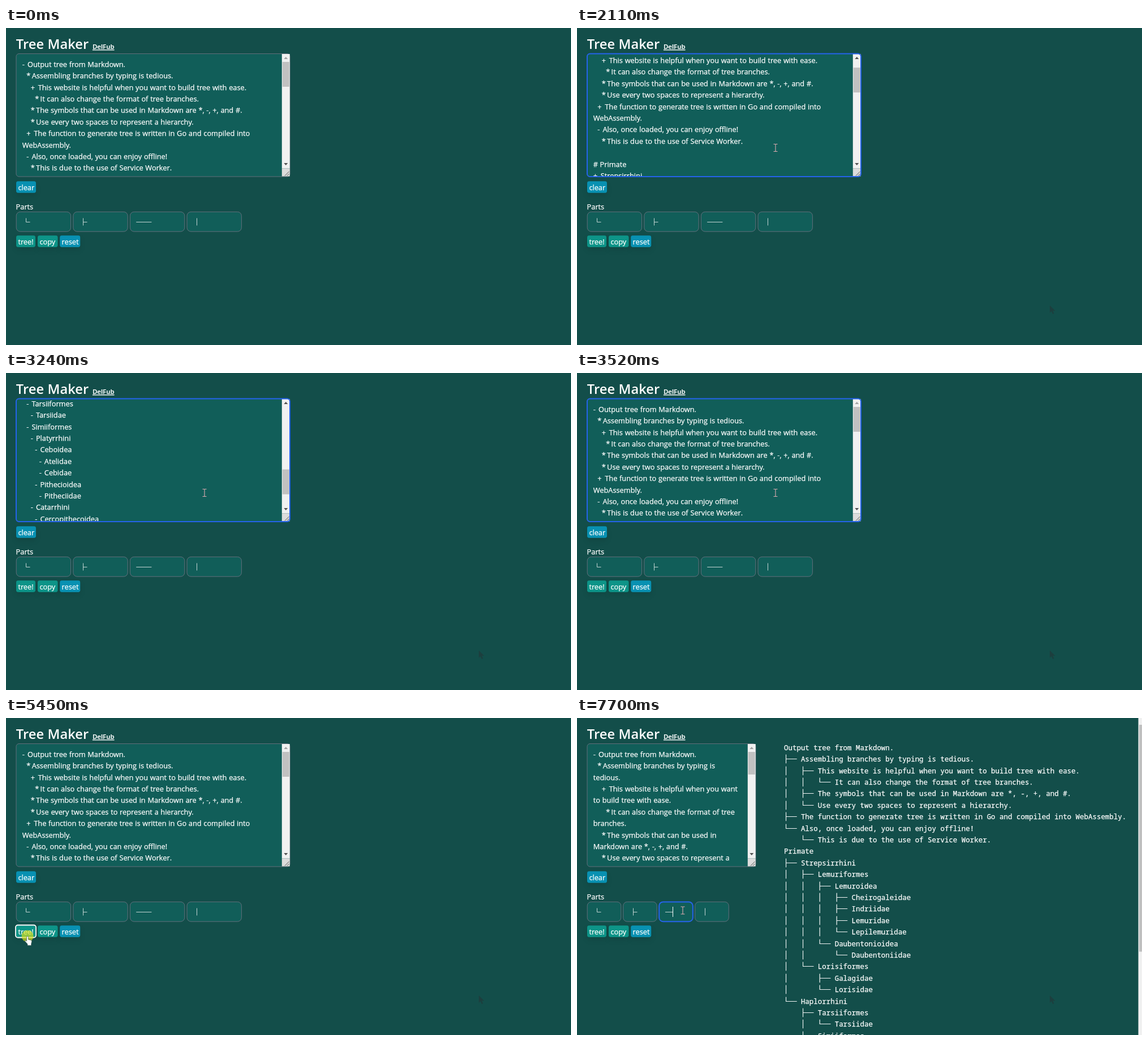
An HTML page that plays this animation: 999x561 px, repeating every 8000 ms.

```html
<!DOCTYPE html>
<html lang="en">
<head>
<meta charset="utf-8">
<title>Tree Maker</title>
<style>
html, body { margin: 0; width: 100%; height: 100%; overflow: hidden; background: #134e4a; }
svg { display: block; width: 100vw; height: 100vh; }
text { fill: #fff; stroke: #fff; stroke-width: .25; font: 12.78px "Open Sans", "Noto Sans", sans-serif; word-spacing: .41px; }
.title { font-size: 23.7px; font-weight: 600; stroke: none; }
.link { font-size: 11.4px; font-weight: 600; text-decoration: underline; }
.mono { font: 500 12.467px "Noto Sans Mono", "DejaVu Sans Mono", monospace; word-spacing: 0; }
.field { fill: #115e59; stroke: #6b7280; stroke-width: .9; }
.focus { fill: none; stroke: #2563eb; stroke-width: 2; }
.part { fill: none; stroke: #c3d5d3; }
.btn { filter: drop-shadow(0 5px 5px rgba(0, 0, 0, .09)); }
</style>
</head>
<body>
<svg id="stage" viewBox="0 0 999 561" preserveAspectRatio="none"></svg>
<script>
const LOOP = 8000, ROW = 20.4;
const BLUE = '#0891b2', TEAL = '#0d9488';
// distance from a list marker to its text
const HANG = { '-': 9.2, '*': 9.4, '+': 13, '#': 11.8 };

// "|" breaks a line in the wide box, "/" in the narrow one
const source = `- Output tree from Markdown.
  * Assembling branches by typing is/tedious.
    + This website is helpful when you want/to build tree with ease.
      * It can also change the format of tree/branches.
    * The symbols that can be used in/Markdown are *, -, +, and #.
    * Use every two spaces to represent a/hierarchy.
  + The function to generate tree is written in Go and compiled into|WebAssembly.
  - Also, once loaded, you can enjoy offline!
    * This is due to the use of Service Worker.

# Primate
+ Strepsirrhini
  - Lemuriformes
    - Lemuroidea
      - Cheirogaleidae
      - Indriidae
      - Lemuridae
      - Lepilemuridae
    - Daubentonioidea
      - Daubentoniidae
  - Lorisiformes
    - Galagidae
    - Lorisidae
+ Haplorrhini
  - Tarsiiformes
    - Tarsiidae
  - Simiiformes
    - Platyrrhini
      - Ceboidea
        - Atelidae
        - Cebidae
      - Pithecioidea
        - Pitheciidae
    - Catarrhini
      - Cercopithecoidea
        - Cercopithecidae
      - Hominoidea
        - Hylobatidae
        - Hominidae`.split('\n');

const stage = document.getElementById('stage');

function add(parent, tag, attrs = {}, content) {
  const el = document.createElementNS('http://www.w3.org/2000/svg', tag);
  for (const k in attrs) el.setAttribute(k, attrs[k]);
  if (content) el.textContent = content;
  parent.appendChild(el);
  return el;
}
const group = parent => add(parent, 'g');
const box = (parent, x, y, w, h, attrs) => add(parent, 'rect', { x, y, width: w, height: h, ...attrs });
const path = (parent, d, attrs) => add(parent, 'path', { d, ...attrs });
const label = (parent, x, y, str, cls = '') => add(parent, 'text', { x, y, class: cls }, str);
const show = (el, on) => { el.style.display = on ? '' : 'none'; };

const indent = line => line.search(/\S|$/) / 2;

function wrap(sep) {
  const other = sep === '|' ? '/' : '|';
  return source.flatMap(line =>
    line.trim().split(sep).map((str, i) => ({
      str: str.replace(other, ' '),
      level: i ? 0 : indent(line)
    })));
}

function treeRows() {
  let shift = 0;
  const nodes = [];
  for (const line of source) {
    if (!line) continue;
    const top = line[0] === '#';
    nodes.push({ level: top ? 0 : indent(line) + shift, str: line.trim().slice(2).replace(/[|/]/, ' ') });
    if (top) shift = 1;
  }
  const more = (i, d) => {
    for (let j = i + 1; j < nodes.length && nodes[j].level >= d; j++)
      if (nodes[j].level === d) return true;
    return false;
  };
  return nodes.map((n, i) => {
    let pre = '';
    for (let d = 1; d <= n.level; d++)
      pre += d < n.level ? (more(i, d) ? '│   ' : '    ') : (more(i, d) ? '├── ' : '└── ');
    return pre.replace(/ /g, '\u00a0') + n.str;
  });
}

function listLine(parent, { str, level }, y) {
  const x = 28.8 + 7.46 * level, hang = HANG[str[0]];
  if (hang) label(parent, x, y, str[0]);
  label(parent, x + (hang || 0), y, hang ? str.slice(2) : str);
}

function textArea(parent, right, sep, thumbH) {
  const w = right - 18, bar = right - 14.2, mid = right - 7.2;
  box(parent, 18, 45.5, w, 217.5, { rx: 5, class: 'field' });
  const id = 'clip' + right;
  box(add(parent, 'clipPath', { id }), 19, 46, w - 15, 216.5);
  const body = group(add(parent, 'g', { 'clip-path': `url(#${id})` }));
  wrap(sep).forEach((l, i) => listLine(body, l, 68.8 + i * ROW));
  const caret = box(body, 115.2, 196.5, 1, 18, { fill: '#fff' });
  box(parent, bar, 46, 14, 202.5, { fill: '#f1f1f1' });
  const up = path(parent, `M${mid - 3.5} 55h7l-3.5-4z`);
  path(parent, `M${mid - 3.5} 239h7l-3.5 4z`, { fill: '#505050' });
  const thumb = box(parent, bar + 1, 60, 12, thumbH, { fill: '#c1c1c1' });
  box(parent, bar, 248.5, 14, 14, { fill: '#dcdcdc' });
  path(parent, `M${right - 9} 261.5l7.5-7.5M${right - 5} 261.5l3.5-3.5`, { stroke: '#555', fill: 'none' });
  const ring = box(parent, 18, 45.5, w, 217.5, { rx: 5, class: 'focus', opacity: 0 });
  return {
    caret, ring,
    scroll(y) {
      body.setAttribute('transform', `translate(0 ${-y})`);
      thumb.setAttribute('y', 60 + y / 4.7);
      up.setAttribute('fill', y ? '#505050' : '#a3a3a3');
    }
  };
}

function parts(parent, step, w) {
  const xs = [0, 1, 2, 3].map(i => 18.2 + i * step);
  xs.forEach(x => box(parent, x, 325.4, w, 34.8, { rx: 7, class: 'field' }));
  const draw = d => path(parent, d, { class: 'part' });
  const mid = xs.map(x => Math.floor(x + 17.4) + .5);
  draw(`M${mid[0]} 336.5v7h7`);
  draw(`M${mid[1]} 336.5v13m0-6h7`);
  draw(`M${mid[3]} 336.5v13`);
  return draw(`M${xs[2] + 10.8} 343.5h27.2`);
}

function button(x, y, w, str, fill) {
  box(stage, x, y, w, 20.4, { rx: 3.4, fill, class: 'btn' });
  label(stage, x + 3.4, y + 15.3, str);
}

// page
box(stage, 0, 0, 999, 561, { fill: '#134e4a' });
label(stage, 17.8, 37, 'Tree Maker', 'title');
label(stage, 153, 37.2, 'DelFub', 'link');
button(18, 271.3, 35, 'clear', BLUE);
label(stage, 17.6, 320.8, 'Parts');
button(18, 367.3, 34, 'tree!', TEAL);
button(56, 367.3, 35.5, 'copy', TEAL);
button(95.2, 367.3, 36, 'reset', BLUE);

const before = group(stage), after = group(stage);
const wide = textArea(before, 502, '|', 44);
parts(before, 100.6, 96.4);

const narrow = textArea(after, 316, '/', 40);
narrow.scroll(0);
show(narrow.caret, false);
const dash = parts(after, 63.5, 59.6);
treeRows().forEach((str, i) => label(after, 366, 56.8 + i * ROW, str, 'mono'));
box(after, 992.5, 0, 6.5, 561, { fill: '#f1f1f1' });
box(after, 994, 12, 5, 401.5, { fill: '#c1c1c1' });
const partRing = box(after, 145.2, 325.4, 59.6, 34.8, { rx: 7, class: 'focus' });
const partCaret = box(after, 183, 334, 1, 18, { fill: '#fff' });

const treeRing = box(stage, 17, 366.5, 36, 22, { rx: 4, fill: 'none', stroke: '#fff', 'stroke-width': 1.8 });

// pointer
const ARROW = 'M0 0v13l3-2.7 2.2 5 2.2-1-2.2-4.8h4.3z';
const trace = path(stage, ARROW, { fill: '#1d3f3e', transform: 'translate(836 491)' });
const pointer = group(stage);
const glow = add(pointer, 'circle', { r: 10.5, fill: '#d6e01c', opacity: .68 });
const shapes = {
  arrow: path(pointer, ARROW, { fill: '#fff', stroke: '#000', 'stroke-width': .7 }),
  beam: path(pointer, 'M-3.5-6.5h2.5q1 0 1 1 0-1 1-1h2.5M0-6v12M-3.5 6.5h2.5q1 0 1-1 0 1 1 1h2.5',
    { fill: 'none', stroke: '#dfabb1', 'stroke-width': 1.1 }),
  hand: path(pointer, 'M-1.4 1.2Q0-.8 1.4 1.2V6l5 1.2q1.4.6 1.2 2.4l-1 4.4v2.6H0V14l-4-4.6q-.8-1.8 1-1.8l1.6 1.4z',
    { fill: '#fff', stroke: '#33504d', 'stroke-width': .6 })
};

// start, end, number of steps, then the place reached
const moves = [
  [210, 350, 3, 580, 352],
  [620, 890, 5, 351, 212],
  [4040, 4310, 5, 130, 358],
  [4570, 5050, 8, 38, 386],
  [5840, 6050, 4, 172, 346],
  [6110, 6500, 7, 187, 340.5]
];
const down = [12, 47.6, 130, 215, 300, 385, 465, 533.9, 575, 598, 610, 614];
const back = [520, 340, 150, 30, 0];
const fade = [.4, .8, 1];

const within = (t, a, b) => t >= a && t < b;
const stepAt = (t, a, b, n) => Math.min(n - 1, Math.floor((t - a) / (b - a) * (n - 1) + 1e-6));

function place(t) {
  let x = 964, y = 560.5;
  for (const [a, b, n, tx, ty] of moves) {
    if (t < a) break;
    const p = (stepAt(t, a, b, n) + 1) / n;
    x += (tx - x) * p;
    y += (ty - y) * p;
  }
  return [x, y];
}

function kindAt(x, y, right, step, w) {
  if (y > 45 && y < 263 && x > 18 && x < right - 14) return 'beam';
  if (y > 325 && y < 361 && x > 18 && x < 18 + 4 * step && (x - 18) % step < w) return 'beam';
  if (y > 367 && y < 388 && x > 18 && x < 131) return 'hand';
  return 'arrow';
}

function scrollAt(t) {
  if (t < 2040 || t >= 3520) return 0;
  return t < 3240 ? down[stepAt(t, 2040, 2780, 12)] : back[stepAt(t, 3240, 3520, 5)];
}

function draw(t) {
  const built = t >= 5580;
  show(before, !built);
  show(after, built);

  wide.scroll(scrollAt(t));
  show(wide.caret, within(t, 1290, 1760) || within(t, 3780, 4310) || within(t, 4840, 5380));
  const focus = t < 1290 || t >= 5450 ? 0 : t >= 5380 ? .5 : fade[stepAt(t, 1290, 1430, 3)];
  wide.ring.setAttribute('opacity', focus);

  show(treeRing, within(t, 5380, 5840));
  partRing.setAttribute('opacity', t < 6830 ? 0 : fade[stepAt(t, 6830, 6960, 3)]);
  const cut = t >= 7300;
  dash.setAttribute('d', `M156 343.5h${cut ? 13.6 : 27.2}`);
  partCaret.setAttribute('x', cut ? 169 : 183);
  show(partCaret, within(t, 6830, 7230) || t >= 7700);

  const [x, y] = place(t);
  const kind = built ? kindAt(x, y, 316, 63.5, 60) : kindAt(x, y, 502, 100.6, 97);
  show(pointer, t >= 210);
  show(trace, t >= 280);
  pointer.setAttribute('transform', `translate(${x} ${y})`);
  for (const k in shapes) show(shapes[k], k === kind);
  show(glow, within(t, 1290, 1430) || within(t, 5380, 5580) || within(t, 6830, 6960));
}

const start = performance.now();
function tick() {
  draw((performance.now() - start) % LOOP);
  requestAnimationFrame(tick);
}
tick();
</script>
</body>
</html>
```
